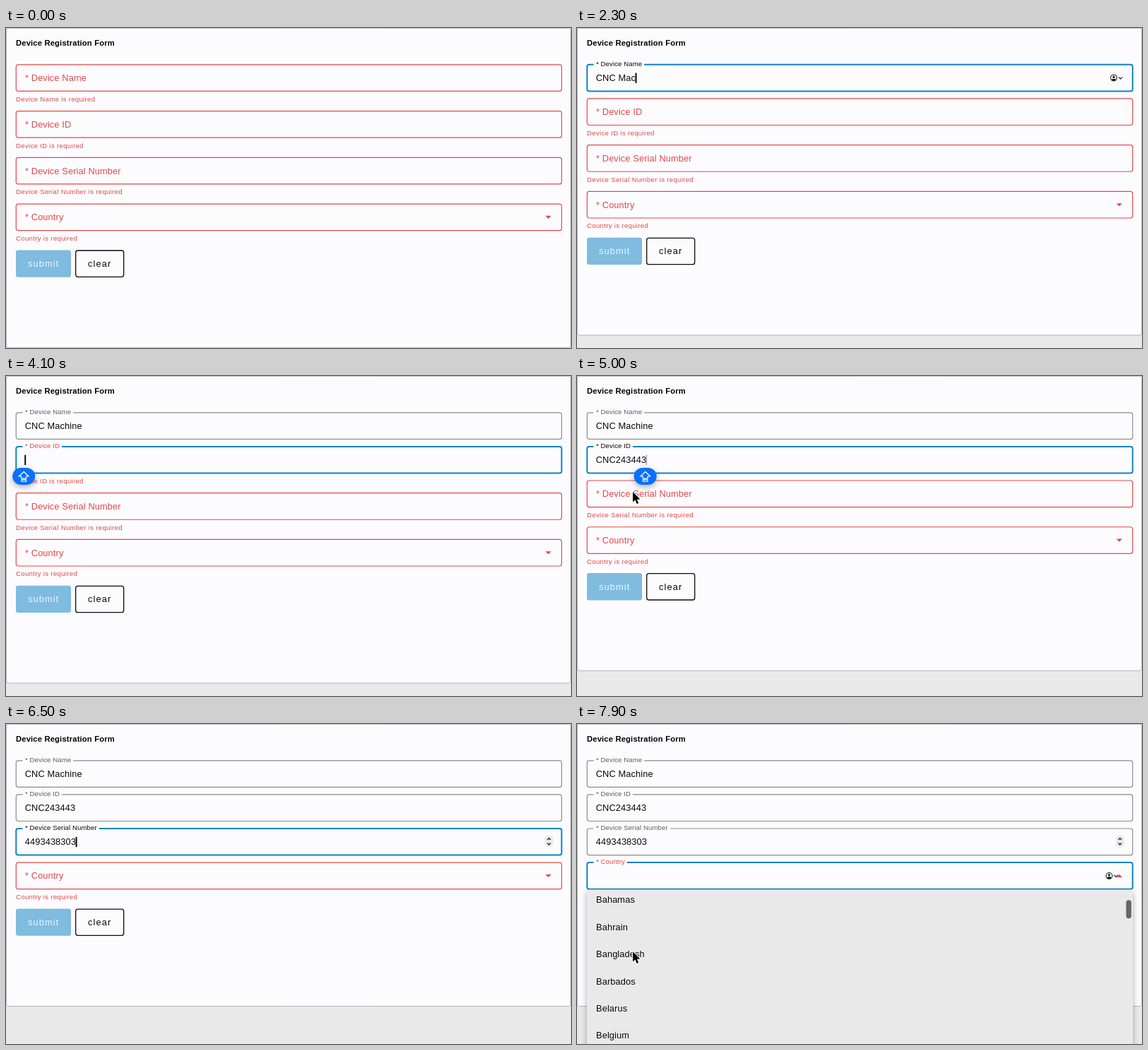
Animation, 800 px wide and 453 px high, one loop 8 s. Source, as an HTML page with a canvas:

```html
<!DOCTYPE html>
<html lang="en">
<head>
<meta charset="utf-8">
<title>Device Registration Form</title>
<style>
html, body { margin: 0; width: 100%; height: 100%; overflow: hidden; background: #e9e9ea; }
canvas { display: block; width: 800px; height: 453px; }
</style>
</head>
<body>
<canvas id="stage"></canvas>
<script>
const W = 800, H = 453, LOOP = 8000, STEP = 100;
const RED = '#e2474a', BLUE = '#0f83c5', INK = '#0a0a0a', PAPER = '#fcfcfe';
const LEFT = 14, RIGHT = 787, FIELD_H = 38.3, ROW = 48.1, ERROR_H = 17.65, ITEM_H = 38.4;
const COUNTRIES = ['Afghanistan', 'Albania', 'Algeria', 'Andorra', 'Angola', 'Antigua and Barbuda',
  'Argentina', 'Armenia', 'Australia', 'Austria', 'Azerbaijan', 'Bahamas', 'Bahrain', 'Bangladesh',
  'Barbados', 'Belarus', 'Belgium', 'Belize', 'Benin'];

const canvas = document.getElementById('stage');
const ctx = canvas.getContext('2d');
const dpr = window.devicePixelRatio || 1;
canvas.width = W * dpr;
canvas.height = H * dpr;

const clamp = v => Math.max(0, Math.min(1, v));
const ease = v => { v = clamp(v); return v * v * (3 - 2 * v); };
const tween = (t, t0, t1, a, b) => a + (b - a) * ease((t - t0) / (t1 - t0));
const between = (t, a, b) => t >= a && t < b;
const typed = (text, t, start, gap) =>
  text.slice(0, Math.max(0, Math.floor((t - start) / gap) + 1));

function setFont(size, spacing, weight = '') {
  ctx.font = `${weight} ${size}px "Liberation Sans", Arial, sans-serif`;
  ctx.letterSpacing = spacing + 'px';
}

function write(text, x, y, color, size = 12.8, spacing = 0.12, weight = '') {
  setFont(size, spacing, weight);
  ctx.fillStyle = color;
  ctx.fillText(text, x, y);
}

function measure(text, size = 12.8, spacing = 0.12) {
  setFont(size, spacing);
  return ctx.measureText(text).width;
}

function box(x, y, w, h, r, fill, stroke, line = 1) {
  ctx.beginPath();
  ctx.roundRect(x, y, w, h, r);
  if (fill) { ctx.fillStyle = fill; ctx.fill(); }
  if (stroke) { ctx.strokeStyle = stroke; ctx.lineWidth = line; ctx.stroke(); }
}

function poly(points, fill, stroke, line = 1, closed = true) {
  ctx.beginPath();
  points.forEach(([x, y]) => ctx.lineTo(x, y));
  if (closed) ctx.closePath();
  if (stroke) { ctx.strokeStyle = stroke; ctx.lineWidth = line; ctx.stroke(); }
  if (fill) { ctx.fillStyle = fill; ctx.fill(); }
}

const chevron = (x, y, w, h, line = 1.2) =>
  poly([[x - w, y - h], [x, y + h], [x + w, y - h]], null, '#222', line, false);

function accountIcon(x, y) {
  ctx.strokeStyle = ctx.fillStyle = '#1c1c1c';
  ctx.lineWidth = 1.1;
  ctx.beginPath();
  ctx.arc(x, y, 4.4, 0, 7);
  ctx.stroke();
  ctx.beginPath();
  ctx.arc(x, y - 1.2, 1.6, 0, 7);
  ctx.fill();
  ctx.beginPath();
  ctx.ellipse(x, y + 2.8, 3, 1.7, 0, 0, 7);
  ctx.fill();
  chevron(x + 9.5, y + 0.2, 2.7, 1.4);
}

function spinner(y) {
  box(763.5, y + 10.5, 10.5, 15.6, 4, '#ededee', '#dcdcdd', 0.6);
  chevron(768.8, y + 15.2, 2.3, -1.2, 1.4);
  chevron(768.8, y + 22.2, 2.3, 1.2, 1.4);
}

function pointer(x, y) {
  const shape = [[0, 0], [0, 14.6], [3.4, 11.5], [5.7, 17], [8.2, 16], [5.9, 10.7], [10.4, 10.5]];
  poly(shape.map(([px, py]) => [x + px, y + py]), '#000', '#fff', 1.8);
}

function capsBubble(x, y) {
  ctx.save();
  ctx.shadowColor = 'rgba(0,0,0,.3)';
  ctx.shadowBlur = 8 * dpr;
  ctx.shadowOffsetY = 3 * dpr;
  box(x - 16, y - 12, 32, 24, 12, '#0870ff');
  ctx.restore();
  const head = [[0, -6.5], [6.8, 0], [3.4, 0], [3.4, 3.2], [-3.4, 3.2], [-3.4, 0], [-6.8, 0]];
  poly(head.map(([px, py]) => [x + px, y + py]), null, '#fff', 1.2);
  box(x - 3.4, y + 4.9, 6.8, 2.4, 0.3, null, '#fff', 1.1);
}

function drawField(f, y) {
  const invalid = !f.value;
  const color = f.focus ? BLUE : invalid ? '#e6484b' : '#8c8c8c';
  const line = f.focus ? 2 : 1.2;
  box(LEFT + 0.3, y + 0.4, RIGHT - LEFT - 0.6, FIELD_H - 0.7, 3, null, color, line);

  const label = '* ' + f.name;
  if (f.focus || f.value) {
    const gap = measure(label, 9.6, 0.09) + 6.5;
    ctx.fillStyle = PAPER;
    ctx.fillRect(23.5, y - 2, gap, 5);
    write(label, 27, y + 2.6, invalid ? RED : f.focus ? INK : '#5e5e5e', 9.6, 0.09);
  } else {
    write(label, 27, y + 23.7, RED);
  }
  write(f.value, 26.7, y + 23.7, INK);
  if (invalid) write(f.name + ' is required', LEFT, y + 52.4, RED, 9.6, 0.32);

  if (f.focus && !f.select) {
    ctx.fillStyle = f.thinCaret ? '#777' : '#000';
    ctx.fillRect(f.caretX - 0.6, y + 12.2, f.thinCaret ? 1 : 1.9, 14.4);
  }
  const mid = y + 19.2;
  if (f.focus && f.account) accountIcon(f.account, mid);
  if (f.number && (f.focus || f.value)) spinner(y);
  if (f.select) {
    const dir = f.focus ? -1 : 1;
    poly([[763.8, mid - 2 * dir], [772, mid - 2 * dir], [767.9, mid + 2.1 * dir]], RED);
  }
}

function drawList(top, scroll, opacity) {
  ctx.save();
  ctx.globalAlpha = opacity;
  ctx.shadowColor = 'rgba(0,0,0,.32)';
  ctx.shadowBlur = 9 * dpr;
  ctx.shadowOffsetY = 4 * dpr;
  box(LEFT, top, RIGHT - LEFT, 240, 3, '#e9e9ea');
  ctx.shadowColor = 'transparent';
  ctx.beginPath();
  ctx.rect(LEFT, top, RIGHT - LEFT, 240);
  ctx.clip();
  COUNTRIES.forEach((name, i) => write(name, 27, top + 23.5 + i * ITEM_H - scroll, INK));
  box(777.5, top + 2 + scroll * 0.03, 7.4, 26, 3.7, '#666');
  ctx.restore();
}

function pointerAt(t) {
  if (between(t, 400, 900)) return 72;
  if (between(t, 2900, 3500)) return tween(t, 2900, 3100, 72, 118);
  if (between(t, 4900, 5500)) return tween(t, 4800, 5000, 118, 164);
  if (t >= 6800) return t < 7400 ? tween(t, 6700, 7000, 164, 218) : tween(t, 7400, 7700, 218, 322);
  return null;
}

function idText(t) {
  if (t < 3800) return typed('d', t, 3600, 100);
  return typed('CNC243443', t, 4200, 100);
}

function formAt(t) {
  return [
    { name: 'Device Name', focus: between(t, 600, 3100), account: 760,
      value: t < 2300 ? typed('CNC Mac', t, 1100, 200) : typed('CNC Machine', t, 1700, 100) },
    { name: 'Device ID', focus: between(t, 3100, 5200), value: idText(t), thinCaret: t >= 5000 },
    { name: 'Device Serial Number', focus: between(t, 5200, 7000), number: true,
      value: typed('4493438303', t, 5600, 100) },
    { name: 'Country', focus: t >= 7000, select: true, account: 753.5, value: '' }
  ];
}

function draw(t) {
  const fields = formAt(t);
  const errors = fields.filter(f => !f.value).length;
  ctx.setTransform(dpr, 0, 0, dpr, 0, 0);
  ctx.fillStyle = '#e9e9ea';
  ctx.fillRect(0, 0, W, H);
  const bottom = 452.5 - (4 - errors) * ERROR_H;
  box(0.5, 0.3, 799, bottom - 0.3, 3, PAPER, '#b5b5b7', 1);
  write('Device Registration Form', LEFT, 24.6, '#000', 11.2, 0.18, 'bold');

  let y = 51.4;
  for (const f of fields) {
    f.caretX = 26.9 + measure(f.value);
    f.top = y;
    drawField(f, y);
    y += ROW + (f.value ? 0 : ERROR_H);
  }

  box(LEFT, y, 78, 38.3, 3, '#80bbe0');
  write('submit', 31, y + 23.5, '#eef6fb', 12.8, 1.14);
  box(98.7, y + 0.6, 68, 37.3, 3, PAPER, '#0a0a0a', 1.3);
  write('clear', 116, y + 23.5, INK, 12.8, 1.14);

  if (between(t, 4000, 5200)) capsBubble(fields[1].caretX - 1.7, fields[1].top + 42.5);
  if (t >= 7100) {
    drawList(fields[3].top + FIELD_H + 0.4, tween(t, 7500, 7900, 0, 427), clamp((t - 7000) / 200));
  }
  const mouseY = pointerAt(t);
  if (mouseY !== null) pointer(79, mouseY);
}

function tick() {
  const t = performance.now() % LOOP;
  draw(Math.floor(t / STEP) * STEP);
  requestAnimationFrame(tick);
}
tick();
</script>
</body>
</html>
```
